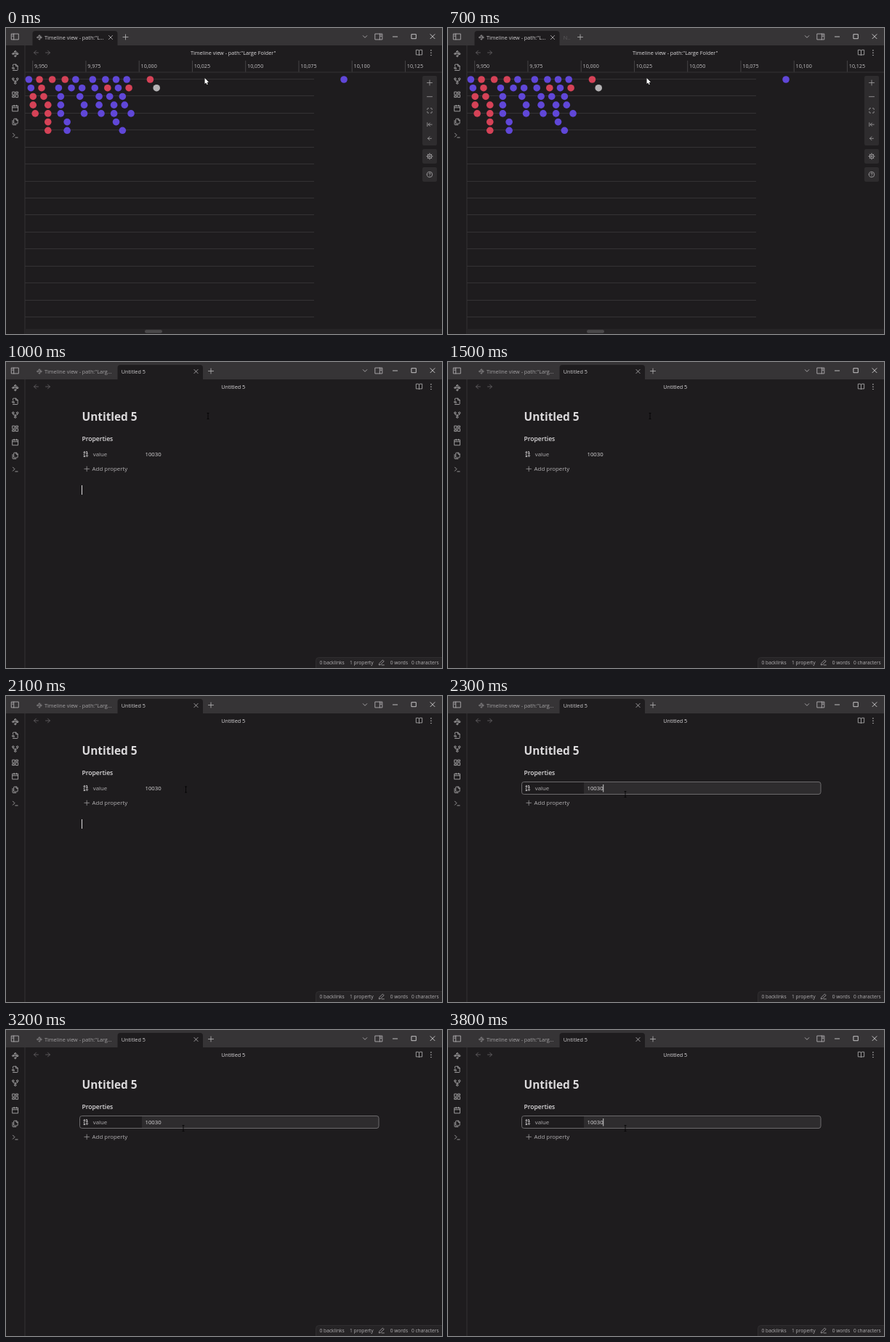
These frames come from a looping animation (600 px wide and 422 px high, 3900 ms). An HTML page with a canvas:

```html
<!DOCTYPE html>
<html lang="en">
<head>
<meta charset="utf-8">
<title>Timeline note</title>
<style>
  html, body { margin: 0; width: 100%; height: 100%; overflow: hidden; background: #1e1c1e; }
  canvas { display: block; }
</style>
</head>
<body>
<canvas id="stage" width="600" height="422"></canvas>
<script>
const ctx = document.getElementById('stage').getContext('2d');
const LOOP = 3900, STEP = 100;
const BG = '#1e1c1e', BAR = '#363436', LINE = '#343234', PANEL = '#2e2c2e';
const BRIGHT = '#dcdadc', MUTED = '#b3b1b3', DIM = '#959395', FAINT = '#666466';

const ring = (x, y, r) => `M${x - r} ${y}a${r} ${r} 0 1 0 ${2 * r} 0a${r} ${r} 0 1 0 ${-2 * r} 0`;
const box = (x, y, w, h) => `M${x} ${y}h${w}v${h}h${-w}z`;

// Icons live on a 24 x 24 grid
const icons = {
  nodes: ring(12, 4.5, 2.5) + 'm8.2 1.8-3.9 3.9' + ring(4.5, 12, 2.5) + 'M7 12h10' +
    ring(19.5, 12, 2.5) + 'M13.8 17.7l3.9-3.9M10.2 6.3l-3.9 3.9' + ring(12, 19.5, 2.5),
  fileSearch: 'M4 22h14a2 2 0 0 0 2-2V7.5L14.5 2H6a2 2 0 0 0-2 2v3M14 2v6h6M9 18l-1.5-1.5' + ring(5, 14, 3),
  fork: ring(12, 19, 3) + ring(5, 5, 3) + ring(19, 5, 3) + 'M19 8v2c0 1-1 2-2 2H7c-1 0-2-1-2-2V8M12 12v4',
  grid: box(3, 3, 7, 9) + box(14, 3, 7, 5) + box(14, 12, 7, 9) + box(3, 16, 7, 5),
  calendar: box(3, 4, 18, 18) + 'M16 2v4M8 2v4M3 10h18',
  files: 'M15.5 2H8.6Q7 2 7 3.6v12.8Q7 18 8.6 18h9.8q1.6 0 1.6-1.6V6.5zM3 7.6v12.8Q3 22 4.6 22h9.8M15 2v5h5',
  terminal: 'M4 17l6-6-6-6M12 19h8',
  left: 'M12 19l-7-7 7-7M19 12H5',
  right: 'M12 5l7 7-7 7M5 12h14',
  toLine: 'M3 19V5m10 1-6 6 6 6M7 12h14',
  book: 'M12 7v14l-2-2H2V3h7q3 0 3 4 0-4 3-4h7v16h-8l-2 2',
  dots: ring(12, 4, 1) + ring(12, 12, 1) + ring(12, 20, 1),
  chevron: 'M4 8l8 8 8-8',
  panelLeft: box(1, 3, 22, 18) + 'M8 3v18M4 7h1M4 11h1',
  panelRight: box(1, 3, 22, 18) + 'M15 3v18M18 7h2M18 11h2',
  plus: 'M12 2v20M2 12h20',
  minus: 'M2 12h20',
  square: box(3, 3, 18, 18),
  close: 'M3 3l18 18M21 3L3 21',
  corners: 'M8 3H5a2 2 0 0 0-2 2v3m18 0V5a2 2 0 0 0-2-2h-3m0 18h3a2 2 0 0 0 2-2v-3M3 16v3a2 2 0 0 0 2 2h3',
  gear: ring(12, 12, 3) + ring(12, 12, 8) +
    'M12 1v3M12 20v3M1 12h3M20 12h3M4.2 4.2l2.1 2.1M17.7 17.7l2.1 2.1M4.2 19.8l2.1-2.1M17.7 6.3l2.1-2.1',
  help: ring(12, 12, 10) + 'M9 9a3 3 0 0 1 6 1c0 2-3 3-3 3M12 17v.1',
  binary: 'M14 16q0-2 2-2t2 2v2q0 2-2 2t-2-2zM6 6q0-2 2-2t2 2v2q0 2-2 2t-2-2zM6 20h4M14 10h4M6 14h2v6M14 4h2v6',
  pencil: 'M12 21h9M16.5 3.5l4 4L7 20l-5 1 1-5z'
};
for (const name in icons) icons[name] = new Path2D(icons[name]);

// Dot columns per row; r = red, g = grey, otherwise purple
const dotRows = [
  '0 5r 11r 17r 22 30 36 41 46 57r 148',
  '1 6r 14 20 25 31 37r 42 47r 60g',
  '2r 7r 15 24 33 38 44',
  '2r 9r 15 26 33 40 45',
  '3r 9r 15 26 34 40 48',
  '9r 18 41',
  '9r 18 44'
].map(row => row.split(' '));

function icon(name, x, y, size, color = MUTED, weight = 2) {
  ctx.save();
  ctx.translate(x - size / 2, y - size / 2);
  ctx.scale(size / 24, size / 24);
  ctx.strokeStyle = color;
  ctx.lineWidth = weight;
  ctx.lineCap = ctx.lineJoin = 'round';
  ctx.stroke(icons[name]);
  ctx.restore();
}

function text(str, x, y, size = 7.25, color = MUTED, weight = 400, align = 'left') {
  ctx.font = `${weight} ${size}px "Open Sans", "Noto Sans", sans-serif`;
  ctx.textAlign = align;
  ctx.fillStyle = color;
  ctx.fillText(str, x, y);
}

function rect(x, y, w, h, color) {
  ctx.fillStyle = color;
  ctx.fillRect(x, y, w, h);
}

function round(x, y, w, h, radius, fill, stroke) {
  ctx.beginPath();
  ctx.roundRect(x, y, w, h, radius);
  if (fill) { ctx.fillStyle = fill; ctx.fill(); }
  if (stroke) { ctx.strokeStyle = stroke; ctx.lineWidth = 1; ctx.stroke(); }
}

const ease = (t, from, to) => {
  const p = Math.min(1, Math.max(0, (t - from) / (to - from)));
  return p * p * (3 - 2 * p);
};

function tabWidth(t) {
  if (t < 700) return 0;
  if (t < 800) return 17.5;
  return 27.5 + 90 * ease(t, 800, 1000);
}

function drawFrame(t, noteOpen) {
  rect(0, 0, 600, 422, BG);
  rect(0, 0, 600, 24, BAR);
  rect(25.5, 24, 1, 398, LINE);

  const width = tabWidth(t), tabEnd = 153.5 + width;
  if (noteOpen) round(153.5, 4, width, 20, [4, 4, 0, 0], BG);
  else round(36.5, 4, 117, 20, [4, 4, 0, 0], BG);

  icon('nodes', 46, 13, 8, noteOpen ? DIM : MUTED);
  text('Timeline view - path:"L' + (noteOpen ? 'arg...' : '...'), 53, 15.8, 7.25, noteOpen ? '#a3a1a3' : '#d0ced0');
  if (noteOpen) {
    ctx.save();
    ctx.beginPath();
    ctx.rect(158, 4, width - 21.5, 20);
    ctx.clip();
    text('Untitled 5', 158.8, 15.8, 7.25, '#d0ced0');
    ctx.restore();
    icon('close', tabEnd - 9.5, 13, 7, MUTED, 2.8);
  } else {
    icon('close', 144, 13, 7, MUTED, 2.8);
    if (width) text('N..', 158.8, 15.8, 7.25, '#5c5a5c');
  }
  icon('plus', tabEnd + 11, 12.5, 8.5, MUTED, 2.4);

  icon('panelLeft', 12.5, 12, 10.5);
  icon('chevron', 494, 12, 8, MUTED, 2.6);
  icon('panelRight', 513, 12, 10.5);
  icon('minus', 535.5, 12, 7.5, BRIGHT, 2.6);
  icon('square', 561.3, 11.7, 8, BRIGHT, 2.6);
  icon('close', 587, 11.7, 8, BRIGHT, 2.6);

  ['nodes', 'fileSearch', 'fork', 'grid', 'calendar', 'files', 'terminal']
    .forEach((name, i) => icon(name, 12.8, 35.6 + i * 18.75, 10));

  icon('left', 41.5, 34, 10, FAINT);
  icon('right', 57.5, 34, 10, FAINT);
  icon('book', 568.5, 34, 10);
  icon('dots', 585, 34.2, 10);
  text(noteOpen ? 'Untitled 5' : 'Timeline view - path:"Large Folder"', 312.7, 37.3, 7.25, BRIGHT, 400, 'center');
}

function drawTimeline() {
  rect(26, 60.5, 574, 1, LINE);
  for (let i = 0; i < 8; i++) {
    const x = 36.7 + i * 73.25;
    rect(x - 0.5, 45, 1, 15.5, '#454345');
    text((9950 + i * 25).toLocaleString('en-US'), x + 2.4, 55.2, 7.15, '#c4c2c4');
  }
  for (let i = 0; i < 15; i++) rect(26, Math.round(69.8 + i * 23.45), 398, 1, LINE);

  dotRows.forEach((row, r) => row.forEach(cell => {
    ctx.beginPath();
    ctx.arc(31.4 + 2.93 * parseInt(cell), 71 + r * 11.72, 4.8, 0, 7);
    ctx.fillStyle = { r: '#d54257', g: '#b4b2b4' }[cell.slice(-1)] || '#6047d8';
    ctx.fill();
  }));

  round(573, 66, 20, 96, 2, PANEL);
  round(573, 167, 20, 20, 2, PANEL);
  round(573, 192, 20, 20, 2, PANEL);
  ['plus', 'minus', 'corners', 'toLine', 'left'].forEach((name, i) => icon(name, 583, 75.5 + i * 19.2, 8.5));
  icon('gear', 583, 177, 9);
  icon('help', 583, 202, 9);

  rect(26, 415, 574, 7, '#262426');
  round(191, 416.3, 24, 4.4, 2.2, '#4a484a');

  ctx.beginPath();
  [[273.5, 69], [273.5, 77], [275.3, 75.4], [276.6, 78.2], [277.8, 77.6], [276.6, 75], [279, 74.8]]
    .forEach(p => ctx.lineTo(...p));
  ctx.closePath();
  ctx.strokeStyle = '#000';
  ctx.lineWidth = 0.8;
  ctx.stroke();
  ctx.fillStyle = '#fff';
  ctx.fill();
}

function drawNote(t) {
  const focusAt = 2250, focused = t >= focusAt;
  const caretOn = (t - (focused ? focusAt : 750)) % 1060 < 530;

  text('Untitled 5', 104.5, 80.8, 15.4, BRIGHT, 700);
  text('Properties', 104.5, 109.4, 8.55, BRIGHT, 600);

  if (focused) {
    round(101.5, 118.5, 411.5, 17, 3, PANEL);
    round(101.5, 118.5, 85.5, 17, [3, 0, 0, 3], BG);
    round(101.5, 118.5, 411.5, 17, 3, null, '#6c6a6c');
  }
  icon('binary', 109.7, 127, 10.5, BRIGHT);
  text('value', 119.8, 130.2, 7.8);
  text('10030', 191.5, 130.2, 7.75, BRIGHT);
  icon('plus', 111.2, 147.4, 8);
  text('Add property', 118.6, 150.4, 7.9);

  if (caretOn) {
    if (focused) rect(213.3, 122, 0.9, 10.5, BRIGHT);
    else rect(104, 170, 1, 13, BRIGHT);
  }

  const full = t >= 1000, left = full ? 426.5 : 507.5;
  round(left, 407.5, 610 - left, 20, [4, 0, 0, 0], '#262426', '#2f2d2f');
  if (full) {
    text('0 backlinks', 431.5, 417, 6.7);
    text('1 property', 473, 417, 6.7);
  }
  icon('pencil', 517, 414.5, 9);
  text('0 words', 528.7, 417, 6.6);
  text('0 characters', 558, 417, 6.6);

  const move = ease(t, 1700, 2200), x = 278 - 34 * move, y = 70 + 61 * move;
  rect(x - 0.4, y, 0.8, 8.5, '#000');
  rect(x - 1.5, y, 3, 0.7, '#000');
  rect(x - 1.5, y + 8, 3, 0.7, '#000');
}

function tick(now) {
  const t = Math.floor(now % LOOP / STEP) * STEP;
  const noteOpen = t >= 800;
  drawFrame(t, noteOpen);
  noteOpen ? drawNote(t) : drawTimeline();
  requestAnimationFrame(tick);
}
tick(performance.now());
</script>
</body>
</html>
```
